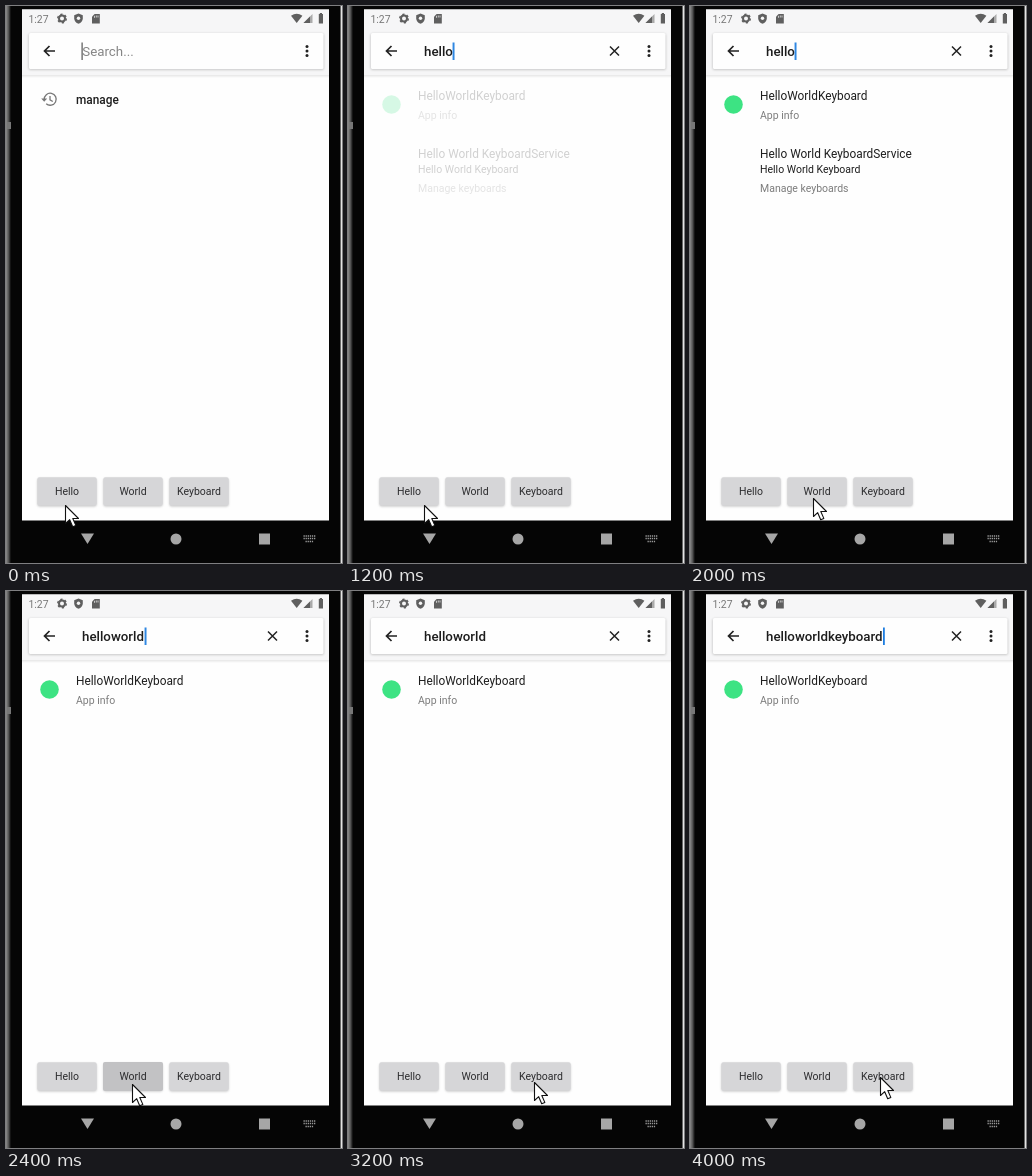
An HTML page for the animation above (4200 ms loop, 336 by 557 pixels).

```html
<!DOCTYPE html>
<html lang="en">
<head>
<meta charset="utf-8">
<title>Keyboard search</title>
<style>
html, body { margin: 0; width: 100%; height: 100%; overflow: hidden; background: #050505; }
svg { display: block; width: 100vw; height: 100vh; font-family: Roboto, Arial, sans-serif; }
.title { font-size: 11.85px; fill: #1e1e1e; }
.sub { font-size: 10.5px; fill: #7c7c7c; }
.query { font-size: 13.3px; font-weight: 500; fill: #1c1c1c; }
.label { font-size: 10.5px; fill: #2c2c2e; text-anchor: middle; }
.line { fill: none; stroke: #222; stroke-width: 1.7; }

.anim { animation: 4200ms step-end infinite; }
.empty { animation-name: empty; }
.clear { animation-name: clear; }
.q1 { animation-name: q1; }
.q2 { animation-name: q2; }
.q3 { animation-name: q3; }
.first { animation-name: first; }
.second { animation-name: second; }
.caret { animation-name: caret; fill: #1f7ee0; }
.hint { animation-name: hint; fill: #555; }
.cursor { animation-name: cursor; }
.press { animation-name: press; }
.fade { animation-name: fade; }
.key2 .anim { animation-delay: -2800ms; }
.key3 .anim { animation-delay: -1400ms; }

@keyframes empty { 0% { opacity: 1 } 23.8%, 100% { opacity: 0 } }
@keyframes clear { 0% { opacity: 0 } 23.8%, 100% { opacity: 1 } }
@keyframes q1 { 0% { opacity: 0 } 23.8% { opacity: 1 } 57.14%, 100% { opacity: 0 } }
@keyframes q2 { 0% { opacity: 0 } 57.14% { opacity: 1 } 90.47%, 100% { opacity: 0 } }
@keyframes q3 { 0% { opacity: 0 } 90.47%, 100% { opacity: 1 } }
@keyframes first {
  0% { opacity: 0 } 28.57% { opacity: .2 } 33.33% { opacity: .7 } 38.09%, 100% { opacity: 1 }
}
@keyframes second {
  0% { opacity: 0 } 28.57% { opacity: .2 } 33.33% { opacity: .7 } 38.09% { opacity: 1 }
  57.14%, 100% { opacity: 0 }
}
@keyframes press { 0% { opacity: 0 } 19.04% { opacity: 1 } 23.8%, 100% { opacity: 0 } }
@keyframes fade { 0% { opacity: 0 } 23.8% { opacity: 1 } 28.57%, 100% { opacity: 0 } }
@keyframes hint { 0% { opacity: 1 } 9.52%, 100% { opacity: 0 } }
@keyframes caret {
  0% { transform: translateX(104.6px); opacity: 0 }
  23.8% { transform: translateX(104.6px); opacity: 1 }
  38.09% { transform: translateX(104.6px); opacity: 0 }
  47.61% { transform: translateX(104.6px); opacity: 1 }
  57.14% { transform: translateX(138.6px); opacity: 1 }
  71.42% { transform: translateX(138.6px); opacity: 0 }
  80.95% { transform: translateX(138.6px); opacity: 1 }
  90.47%, 100% { transform: translateX(193px); opacity: 1 }
}
@keyframes cursor {
  0% { transform: translate(59px, 499px) }
  4.76% { transform: translate(59px, 497px) }
  9.52% { transform: translate(59px, 494px) }
  14.28% { transform: translate(59.5px, 488px) }
  23.8% { transform: translate(65px, 492px) }
  28.57% { transform: translate(76px, 499px) }
  33.33% { transform: translate(89px, 501px) }
  38.09% { transform: translate(104px, 498px) }
  42.85% { transform: translate(116px, 495px) }
  47.61% { transform: translate(123px, 492px) }
  57.14% { transform: translate(126px, 493px) }
  61.9% { transform: translate(134px, 502px) }
  66.66% { transform: translate(151px, 508px) }
  71.42% { transform: translate(172px, 498px) }
  76.19% { transform: translate(186px, 491px) }
  80.95% { transform: translate(188px, 489px) }
  85.71% { transform: translate(189px, 488px) }
  90.47% { transform: translate(190px, 487px) }
  95.23%, 100% { transform: translate(190px, 486px) }
}
</style>
</head>
<body>
<svg viewBox="0 0 336 557" preserveAspectRatio="none">
  <defs>
    <filter id="soft" x="-20%" y="-40%" width="140%" height="180%"><feGaussianBlur stdDeviation="1.2"/></filter>
    <linearGradient id="drop" x2="0" y2="1">
      <stop stop-color="#e6e6e6"/><stop offset="1" stop-color="#fefefe"/>
    </linearGradient>
    <linearGradient id="rim">
      <stop stop-color="#8c8c8c"/><stop offset=".5" stop-color="#555"/><stop offset="1" stop-color="#050505"/>
    </linearGradient>
    <clipPath id="keyClip"><rect width="60" height="29" rx="2"/></clipPath>
    <g id="key">
      <rect x=".5" y="1.5" width="59" height="28" rx="2" fill="#c4c4c4" filter="url(#soft)"/>
      <rect x=".3" y=".3" width="59.4" height="28.4" rx="2" fill="#d6d6d8"/>
    </g>
    <g id="ripple">
      <rect x="-1" y="0" width="62" height="30.5" rx="3" fill="#cfcfcf" filter="url(#soft)"/>
      <rect width="60" height="29" rx="2" fill="#cdcdcf"/>
      <circle cx="30" cy="16" r="26" fill="#bfbfc1" clip-path="url(#keyClip)"/>
    </g>
    <rect id="dim" width="60" height="29" rx="2" fill="#c2c2c4"/>
  </defs>

  <!-- device -->
  <rect width="336" height="557" fill="#050505"/>
  <rect width="5" height="557" fill="url(#rim)"/>
  <rect x="334" width="1" height="557" fill="#666"/>
  <rect x="335" width="1" height="557" fill="#e4e4e4"/>
  <rect x="1" y="116" width="4" height="7" fill="#777"/>
  <rect x="16" y="3.5" width="307" height="511" fill="#fefefe"/>
  <rect x="16" y="3.5" width="307" height="66.5" fill="#f6f6f7"/>
  <rect x="16" y="69" width="307" height="3" fill="url(#drop)"/>

  <!-- status bar -->
  <text x="22.5" y="16.5" font-size="10.4" fill="#777">1:27</text>
  <g fill="#5f5f5f">
    <circle cx="56" cy="12.5" r="3" fill="none" stroke="#5f5f5f" stroke-width="2"/>
    <circle cx="56" cy="12.5" r="4.3" fill="none" stroke="#5f5f5f" stroke-width="1.4" stroke-dasharray="2.2 2.3"/>
    <path d="M72.5 7.5l4.3 1.7v3.1c0 2.7-1.8 4.6-4.3 5.5-2.5-.9-4.3-2.8-4.3-5.5V9.2z"/>
    <circle cx="72.5" cy="12.3" r="1.7" fill="#f6f6f6"/>
    <path d="M88.6 8h5.2v9.5H86v-6.8z"/>
    <path d="M88.5 9.8v2M90.3 9.5v2M92 9.5v2" stroke="#f6f6f6" stroke-width=".7"/>
    <path d="M285 9.8q5.7-4 11.4 0l-5.7 7.2z"/>
    <path d="M306.500 8v9h-9z" fill="#aaa"/>
    <path d="M304 10.500v6.500h-6.500z"/>
    <path d="M312.800 8h1v-1h2.200v1h1v9.500h-4.200z"/>
  </g>

  <!-- search bar -->
  <rect x="22.5" y="27.5" width="295.5" height="36.5" rx="2" fill="#c8c8c8" filter="url(#soft)"/>
  <rect x="23" y="27" width="294.5" height="36" rx="1.5" fill="#fefefe"/>
  <path class="line" d="M49 45H38.700M43.500 40l-5 5 5 5"/>
  <g fill="#222">
    <circle cx="301" cy="40.5" r="1.5"/><circle cx="301" cy="45" r="1.5"/><circle cx="301" cy="49.5" r="1.5"/>
  </g>
  <path class="line anim clear" d="M262 40.5l9 9M271 40.5l-9 9" style="stroke-width:1.5"/>
  <text class="anim empty" x="76.3" y="50.3" font-size="13.3" fill="#858585">Search...</text>
  <text class="query anim q1" x="76" y="50.3">hello</text>
  <text class="query anim q2" x="76" y="50.3">helloworld</text>
  <text class="query anim q3" x="76" y="50.3">helloworldkeyboard</text>
  <rect class="anim hint" x="75.5" y="36.5" width="1.2" height="17.5"/>
  <rect class="anim caret" y="36.5" width="1.8" height="17.5"/>

  <!-- recent search -->
  <g class="anim empty">
    <path d="M38.2 93.5a6 6 0 1 1 2 4.2M44 90v3.8l2.8 1.7" fill="none" stroke="#777" stroke-width="1.3"/>
    <path d="M35.2 92.5h6l-3 3.2z" fill="#777"/>
    <text class="title" x="70" y="97.5" font-size="12" font-weight="500">manage</text>
  </g>

  <!-- results -->
  <g class="anim first">
    <circle cx="43.5" cy="98.5" r="9.3" fill="#3de383"/>
    <text class="title" x="70" y="94">HelloWorldKeyboard</text>
    <text class="sub" x="70" y="112.5">App info</text>
  </g>
  <g class="anim second">
    <text class="title" x="70" y="152">Hello World KeyboardService</text>
    <text class="sub" x="70" y="167" style="fill:#1e1e1e">Hello World Keyboard</text>
    <text class="sub" x="70" y="185.5">Manage keyboards</text>
  </g>

  <!-- keys -->
  <g transform="translate(31 471)">
    <use href="#key"/><use href="#ripple" class="anim press"/><use href="#dim" class="anim fade"/>
    <text class="label" x="30" y="18">Hello</text>
  </g>
  <g class="key2" transform="translate(97 471)">
    <use href="#key"/><use href="#ripple" class="anim press"/><use href="#dim" class="anim fade"/>
    <text class="label" x="30" y="18">World</text>
  </g>
  <g class="key3" transform="translate(163 471)">
    <use href="#key"/><use href="#ripple" class="anim press"/><use href="#dim" class="anim fade"/>
    <text class="label" x="30" y="18">Keyboard</text>
  </g>

  <!-- navigation bar -->
  <g fill="#a6a6a6">
    <path d="M75 527.5h13l-6.5 10.5z"/>
    <circle cx="170" cy="533" r="5.5"/>
    <rect x="253" y="527.5" width="11" height="11"/>
  </g>
  <path d="M297.5 530h12M297.5 532.5h12M299.5 535.5h8" fill="none" stroke="#999" stroke-width="1.3" stroke-dasharray="1.3 .8"/>

  <g class="anim cursor">
    <path d="M.5 .5V18.5L4.7 14.7 7.7 21.7 10.8 20.4 7.8 13.5H13.5Z" fill="#fff" stroke="#111" stroke-width="1.1" stroke-linejoin="round"/>
  </g>
</svg>
</body>
</html>
```
